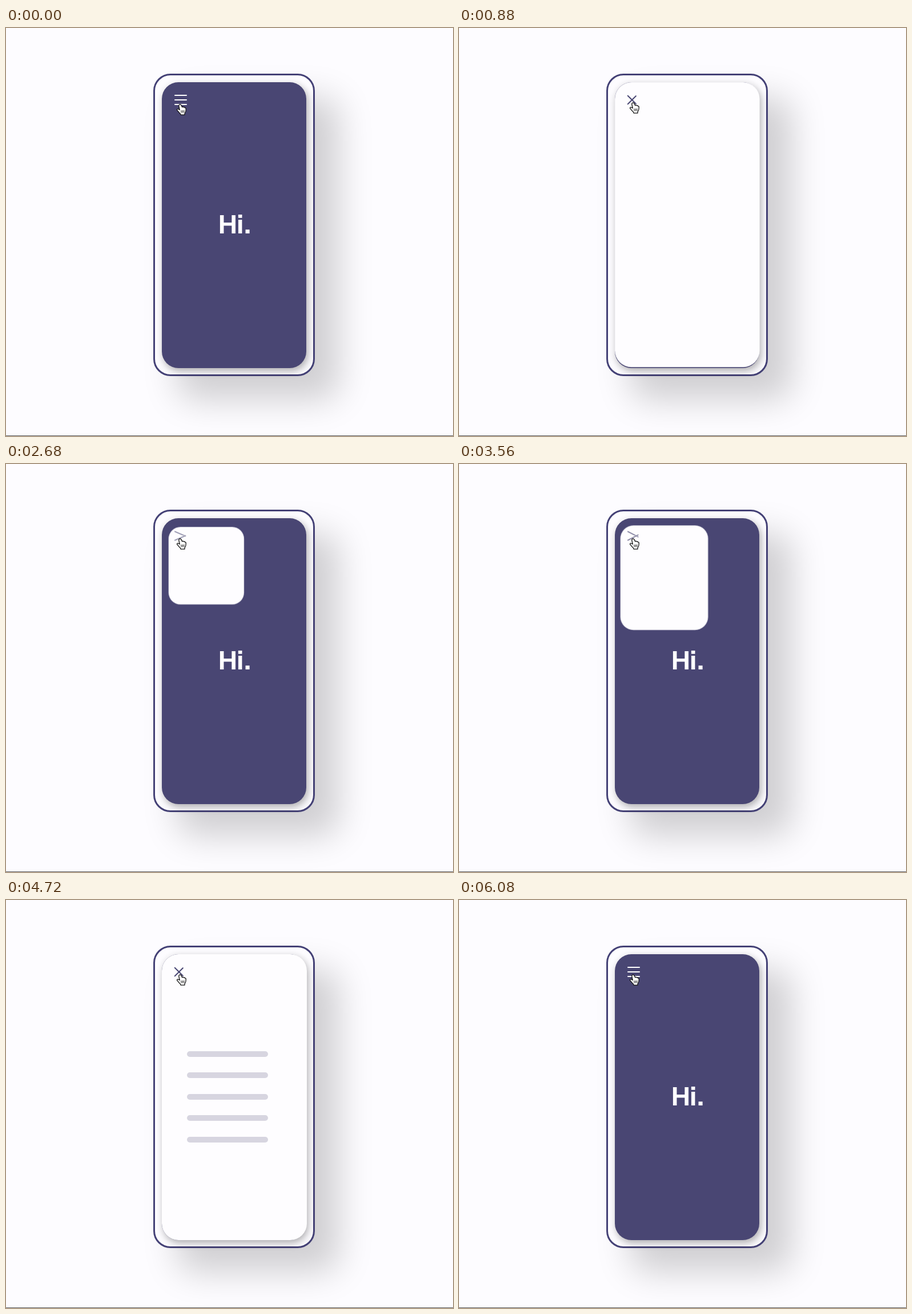
An HTML page for the animation above (6200 ms loop, 783 px wide and 715 px high).

```html
<!DOCTYPE html>
<html lang="en">
<head>
<meta charset="utf-8">
<title>Menu</title>
<style>
  html, body { margin: 0; width: 100%; height: 100%; overflow: hidden; background: #fdfcff; }
  #stage { position: relative; width: 783px; height: 715px; overflow: hidden; background: #fdfcff; }
  #stage * { position: absolute; box-sizing: border-box; }
  #phone {
    left: 258px; top: 80px; width: 282.5px; height: 530px;
    border: 3.2px solid #444176; border-radius: 30px; background: #fdfcff;
    box-shadow: 42px 42px 60px rgba(0, 0, 0, .18);
  }
  #screen {
    left: 272.5px; top: 95px; width: 253.5px; height: 501px;
    border-radius: 29px; background: #494673;
    box-shadow: 3px 5px 14px rgba(0, 0, 0, .32);
  }
  #hi {
    left: 99.5px; top: 222.5px; color: #fff; white-space: pre;
    font: 700 44px/53px Inter, "Liberation Sans", sans-serif;
    font-feature-settings: "ss07", "ss08"; letter-spacing: -.5px;
  }
  #menu {
    left: 0; top: 0; width: 253.5px; background: #fefdff;
    transform-origin: 24.5px 32px;
  }
  .row { left: 316.5px; height: 10px; border-radius: 5px; background: #494673; }
  .bar {
    left: 294.5px; width: 22px; height: 2px; border-radius: 1px;
    background: #fff; transform-origin: 0 50%;
  }
  #floor { left: 0; top: 714px; width: 783px; height: 1px; background: #5c5c60; }
  #hand { left: 296px; top: 128px; }
</style>
</head>
<body>
<div id="stage">
  <div id="phone"></div>
  <div id="screen">
    <div id="hi">Hi.</div>
    <div id="menu"></div>
  </div>
  <div id="floor"></div>
  <svg id="hand" width="24" height="28" viewBox="296 128 24 28">
    <path d="M303.5 131.5C304.8 130.5 306.4 131 307 132.4L308.6 135.7C309.4 134.8 310.8 135 311.2 136
      C312 135.3 313.2 135.9 313.4 136.9C314.5 136.6 315.2 137.4 315.2 138.6L315 142
      C314.8 144 313.5 145.6 313 147L312.9 149.1H306L305.6 147.5C303.4 145.8 301.6 143 299.8 141
      C298.9 139.6 300.4 138.2 302 139.2L304.2 140.5L302.8 134Q302.5 132.4 303.5 131.5Z"
      fill="#fff" stroke="#111" stroke-width="1.3" stroke-linejoin="round"/>
    <path d="M307 141.3V145.6M309.4 141.2V145.6M311.8 141.1V145.5" fill="none" stroke="#111" stroke-width="1"/>
  </svg>
</div>
<script>
const LOOP = 6200;
const stage = document.getElementById("stage");
const hand = document.getElementById("hand");
const menu = document.getElementById("menu");

// [start, duration, opens]
const menuSteps = [[597, 300, 1], [2596, 300, 0], [3456, 300, 1], [5126, 300, 0]];
const rowSteps = [[897, 300, 1], [2160, 400, 0], [3756, 300, 1], [4691, 400, 0]];

function play(el, frames) {
  el.animate(frames, { duration: LOOP, iterations: Infinity });
}

function toggle(el, closed, open, steps) {
  const frames = [{ ...closed, offset: 0 }];
  for (const [start, length, opens] of steps) {
    const [from, to] = opens ? [closed, open] : [open, closed];
    frames.push({ ...from, offset: start / LOOP, easing: "ease" });
    frames.push({ ...to, offset: (start + length) / LOOP });
  }
  frames.push({ ...closed, offset: 1 });
  play(el, frames);
}

function add(kind, top) {
  const el = document.createElement("div");
  el.className = kind;
  el.style.top = top + "px";
  stage.insertBefore(el, hand);
  return el;
}

toggle(menu,
  { transform: "scale(0)", height: "0px", borderRadius: "52px" },
  { transform: "scale(1)", height: "501px", borderRadius: "29px" },
  menuSteps);

for (let i = 0; i < 5; i++) {
  toggle(add("row", 264.7 + 37.55 * i),
    { width: "0px", opacity: 0 },
    { width: "152px", opacity: .228 },
    rowSteps);
}

[45, 0, -45].forEach((angle, i) => {
  const open = angle
    ? { transform: `rotate(${angle}deg)`, backgroundColor: "#494673", opacity: 1 }
    : { transform: "rotate(0deg)", backgroundColor: "#fff", opacity: 0 };
  toggle(add("bar", 117 + 7.75 * i),
    { transform: "rotate(0deg)", backgroundColor: "#fff", opacity: 1 },
    open, menuSteps);
});

play(hand, [
  { transform: "translateY(3px)", offset: 0, easing: "ease" },
  { transform: "translateY(0px)", offset: 320 / LOOP },
  { transform: "translateY(0px)", offset: 1 }
]);
</script>
</body>
</html>
```
